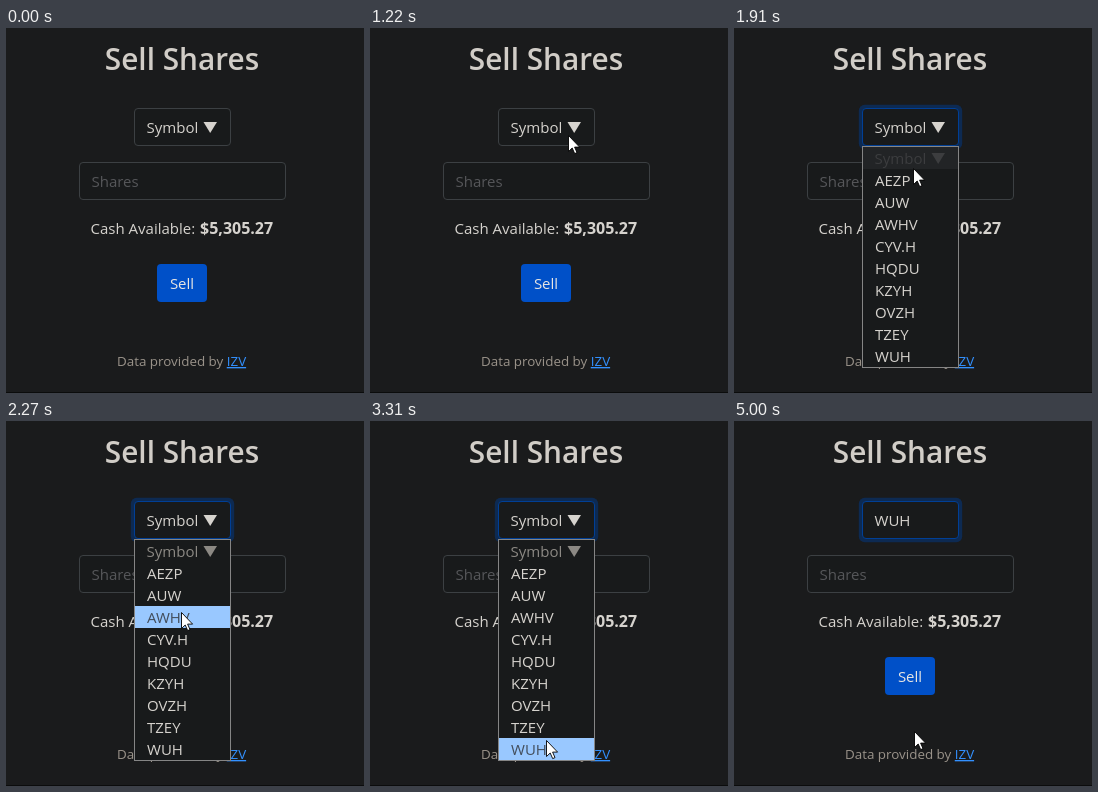
Recreate the animation shown at these times as an HTML page. Size 358 by 365 pixels, loop 5530 ms.

```html
<!DOCTYPE html>
<html lang="en">
<head>
<meta charset="utf-8">
<title>Sell Shares</title>
<style>
  html, body { margin: 0; width: 100%; height: 100%; overflow: hidden; background: #1a1b1c; }
  svg { display: block; width: 358px; height: 365px; }
  text { font: 15px "Open Sans", "Noto Sans", sans-serif; }
  .title { font-size: 29.8px; font-weight: 600; }
  .cash { font-size: 16px; font-weight: 700; }
  .note { font-size: 13.4px; }
  .link { fill: #3391ff; text-decoration: underline; }
  .box { fill: #181a1b; stroke: #3c4043; }

  /* Everything shares one 5530 ms loop; parts switch hard unless a step rule says otherwise. */
  .ring, .menu, .first, .before, .after, .arrow, .move, .beam, .bar {
    animation: 5530ms step-end infinite;
  }
  .ring { animation-name: ring; }
  .menu { animation-name: menu; }
  .first { animation-name: first; }
  .before { animation-name: before; }
  .after { animation-name: after; }
  .arrow { animation-name: arrow; }
  .move { animation-name: move; }
  .beam { animation-name: beam; }
  .bar { animation-name: bar; }

  @keyframes ring {
    0% { opacity: 0; }
    25.85% { opacity: .5; }
    27.12%, 100% { opacity: 1; }
  }
  @keyframes menu {
    0% { opacity: 0; }
    27.12% { opacity: 1; }
    64.91%, 100% { opacity: 0; }
  }
  @keyframes first {
    0% { opacity: 1; }
    35.8%, 100% { opacity: 0; }
  }
  @keyframes before {
    0% { opacity: 1; }
    64.91%, 100% { opacity: 0; }
  }
  @keyframes after {
    0% { opacity: 0; }
    64.91%, 100% { opacity: 1; }
  }
  @keyframes arrow {
    0% { opacity: 0; }
    8.31% { opacity: 1; }
    64.91% { opacity: 0; }
    87.88%, 100% { opacity: 1; }
  }
  @keyframes beam {
    0% { opacity: 0; }
    64.91% { opacity: 1; }
    87.88%, 100% { opacity: 0; }
  }
  /* The pointer advances about every 70 ms. */
  @keyframes move {
    0% { transform: translate(326px, 351px); }
    8.31% { transform: translate(326px, 351px); animation-timing-function: steps(7); }
    17.17% { transform: translate(248px, 187px); animation-timing-function: steps(4); }
    22.06% { transform: translate(198px, 107px); animation-timing-function: steps(3); }
    25.85% { transform: translate(190px, 96px); }
    29.47% { transform: translate(190px, 98px); animation-timing-function: steps(4); }
    34.53% { transform: translate(179px, 140px); animation-timing-function: steps(5); }
    41.04% { transform: translate(175px, 191px); animation-timing-function: steps(7); }
    49.72% { transform: translate(170px, 274px); animation-timing-function: steps(8); }
    59.85% { transform: translate(176px, 319px); animation-timing-function: steps(2); }
    62.38% { transform: translate(182px, 325px); }
    87.88% { transform: translate(181px, 314px); }
    89.14% { transform: translate(180px, 311px); }
    90.41%, 100% { transform: translate(180px, 310px); }
  }
  /* Highlighted row, 22 px each */
  @keyframes bar {
    0% { transform: translateY(-200px); }
    35.8% { transform: translateY(22px); }
    38.51% { transform: translateY(44px); }
    41.04% { transform: translateY(66px); }
    43.57% { transform: translateY(88px); }
    46.11% { transform: translateY(110px); }
    48.46% { transform: translateY(132px); }
    49.72% { transform: translateY(154px); }
    54.79% { transform: translateY(176px); }
    59.85%, 100% { transform: translateY(198px); }
  }
</style>
</head>
<body>
<svg viewBox="0 0 358 365" fill="#d6d3ce">
  <defs>
    <clipPath id="row"><rect class="bar" x="129" y="119" width="95" height="22"/></clipPath>
    <g id="symbol">
      <text x="140.5" y="105">Symbol</text>
      <path d="M197.5 94H211L204.2 105Z"/>
    </g>
    <g id="rows">
      <text x="141" y="158">AEZP</text>
      <text x="141" y="180">AUW</text>
      <text x="141" y="202">AWHV</text>
      <text x="141" y="224">CYV.H</text>
      <text x="141" y="246">HQDU</text>
      <text x="141" y="268">KZYH</text>
      <text x="141" y="290">OVZH</text>
      <text x="141" y="312">TZEY</text>
      <text x="141" y="334">WUH</text>
    </g>
  </defs>

  <rect width="358" height="365" fill="#1a1b1c"/>
  <rect y="364" width="358" height="1" fill="#0b0c0c"/>

  <text class="title" x="176" y="42" text-anchor="middle" fill="#d1cdc7">Sell Shares</text>

  <rect class="box" x="128.5" y="80.5" width="96" height="37" rx="3.5"/>
  <g class="ring">
    <rect x="124.8" y="76.8" width="103.4" height="44.4" rx="6" fill="#0d2a52"/>
    <rect x="128.5" y="80.5" width="96" height="37" rx="3.5" fill="#181a1b" stroke="#003f96"/>
  </g>
  <use class="before" href="#symbol"/>
  <text class="after" x="140.5" y="105">WUH</text>

  <rect class="box" x="73.5" y="134.5" width="206" height="37" rx="3.5"/>
  <text x="85.5" y="159" fill="#56575a">Shares</text>

  <text x="84.5" y="206">Cash Available:</text>
  <text class="cash" x="194" y="206">$5,305.27</text>

  <rect x="151" y="236" width="50" height="38" rx="4" fill="#0050c8"/>
  <text x="176" y="261" text-anchor="middle" fill="#e8e6e3">Sell</text>

  <text class="note" x="111" y="338" fill="#9a938a">Data provided by <tspan class="link">IZV</tspan></text>

  <g class="menu">
    <rect x="128.5" y="118.5" width="96" height="221" fill="#181a1b" stroke="#858585"/>
    <use href="#symbol" y="31" fill="#8c8984"/>
    <g class="first">
      <rect x="129" y="119" width="95" height="22" fill="#222426"/>
      <use href="#symbol" y="31" fill="#3c3d3f"/>
    </g>
    <use href="#rows"/>
    <g clip-path="url(#row)">
      <rect x="129" y="119" width="95" height="220" fill="#99c8ff"/>
      <use href="#rows" fill="#434e5c"/>
    </g>
  </g>

  <g class="beam" fill="none" stroke="#d8d8d8">
    <path d="M179 318.5H182M183 318.5H186M182.5 319V333M179 333.5H182M183 333.5H186"/>
  </g>
  <g class="arrow">
    <path class="move" d="M.5 .5V16.5L4.2 13L6.7 18.6L9 17.6L6.6 12.1H11.6Z" fill="#fff" stroke="#000" stroke-width=".9"/>
  </g>
</svg>
</body>
</html>
```
